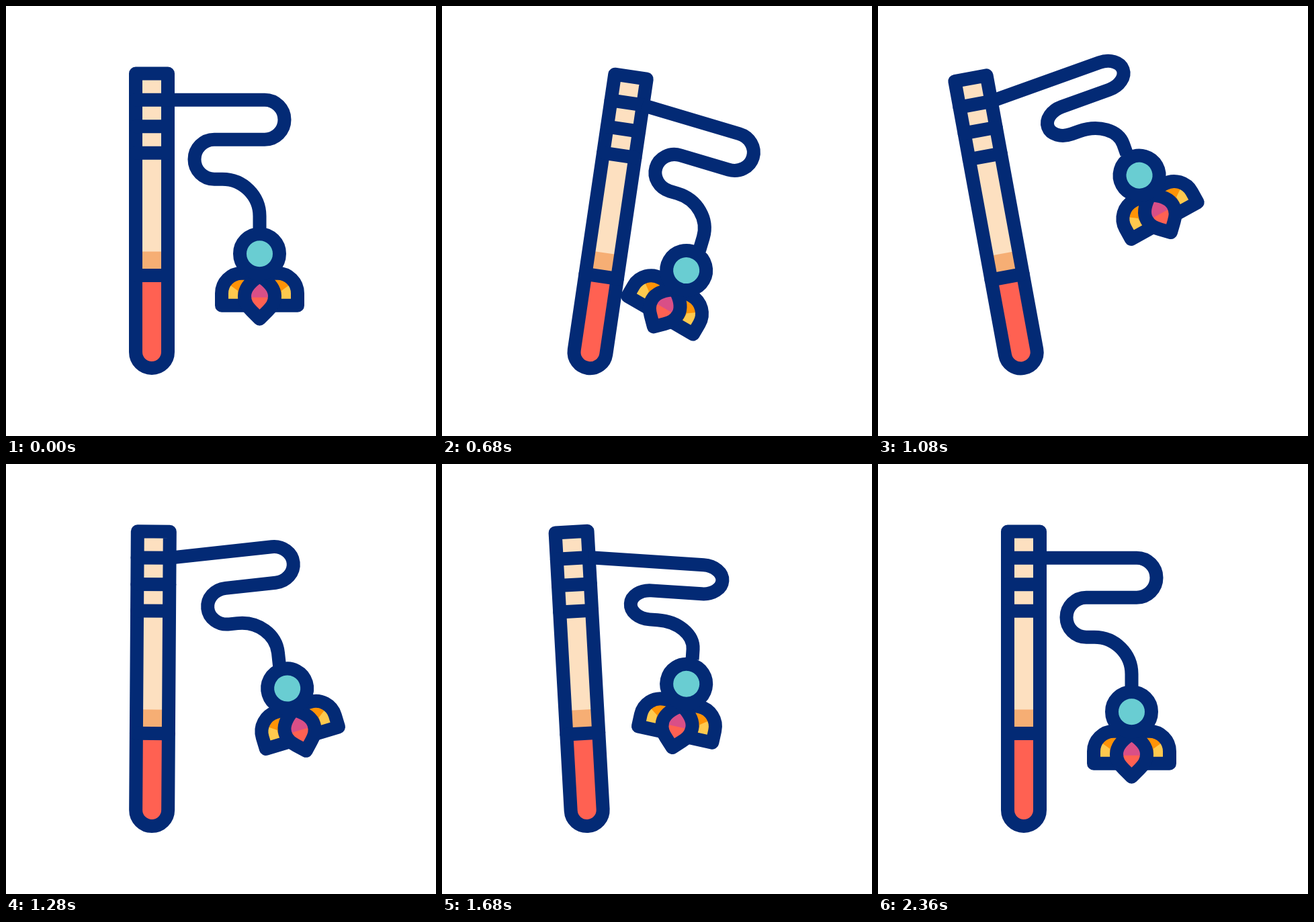
Recreate the animation shown at these times as an HTML page with a canvas. Size 640 px wide and 640 px high, loop 2600 ms.

```html
<!DOCTYPE html>
<html lang="en">
<head>
<meta charset="utf-8">
<title>Cat wand</title>
<style>
  html, body { margin: 0; height: 100%; overflow: hidden; background: #fff; }
  canvas { display: block; width: 100vmin; height: 100vmin; }
</style>
</head>
<body>
<canvas id="stage" width="640" height="640"></canvas>
<script>
const ctx = document.getElementById('stage').getContext('2d');
const LOOP = 2600, STEP = 40;
const NAVY = '#032a75', CREAM = '#fde0c0', TAN = '#f6ae74', RED = '#ff6152',
  TEAL = '#69cdd2', ORANGE = '#ff9307', YELLOW = '#ffc94e', PINK = '#d94f87';

// Turning points of the swing, in ms. Every joint follows them, later and slower.
const BEATS = [200, 690, 1060, 1470, 1825, 2100];

const ease = p => (1 - Math.cos(Math.PI * p)) / 2;

// Eases from rest through the turns, one per beat, and back to rest.
function swing(t, lag, tempo, ...turns) {
  const time = BEATS[0] + (t - BEATS[0] - lag) / tempo;
  const i = BEATS.findIndex(beat => beat > time);
  if (i < 1) return 0;
  const [from = 0, to = 0] = [turns[i - 2], turns[i - 1]];
  return from + (to - from) * ease((time - BEATS[i - 1]) / (BEATS[i] - BEATS[i - 1]));
}

const rodAngle = t => swing(t, 0, 1, 8.4, -10.5, 9, -10);
const cordAngle = t => swing(t, 0, 1.1, 8.4, -10.5, 9, -10);
const toyAngle = t => swing(t, 60, 1.07, 15, -13.5, 10, -11.5);
const cordSquash = t => Math.min(1, swing(t, -150, 1.08, 0, 1.4, 0, 1.4));

const rotate = deg => ctx.rotate(deg * Math.PI / 180);

function rect(color, x, y, w, h) {
  ctx.fillStyle = color;
  ctx.fillRect(x, y, w, h);
}

// Fills a shape in two tones, then outlines it.
function twoTone(shape, base, accent, area) {
  ctx.fillStyle = base;
  ctx.fill(shape);
  ctx.save();
  ctx.clip(shape);
  ctx.fillStyle = accent;
  ctx.fill(area);
  ctx.restore();
  ctx.stroke(shape);
}

const rodShape = new Path2D('M193 100.5H241V515A24 24 0 0 1 193 515Z');
const bands = new Path2D('M193 139.7H241M193 179.2H241M193 218.7H241M193 401H241');
// Toy parts are placed around the centre of its ball.
const petal = new Path2D('M0 29H-26.5A30 30 0 0 0 -56.5 59V77H0Z');
const petalTip = new Path2D('M-70 90V40L-45 46L-32.5 55V90Z');
const gem = new Path2D('M0 33C-14 42 -22.5 52 -22.5 63C-22.5 74 -17 80 -12 85L0 97' +
  'L12 85C17 80 22.5 74 22.5 63C22.5 52 14 42 0 33Z');
const gemTip = new Path2D('M-40 65H40V110H-40Z');

function drawRod() {
  ctx.save();
  ctx.clip(rodShape);
  rect(CREAM, 183, 90, 68, 276);
  rect(TAN, 183, 365.5, 68, 36);
  rect(RED, 183, 401, 68, 150);
  ctx.restore();
  ctx.stroke(rodShape);
  ctx.stroke(bands);
}

function drawCord(shift, scale) {
  const q = Math.PI / 2;
  ctx.beginPath();
  ctx.moveTo(0, 0);
  ctx.save();
  ctx.translate(shift, 0);
  ctx.scale(1, scale);
  ctx.arc(145, 29.5, 29.5, -q, q);
  ctx.arc(70, 88.5, 29.5, -q, q, true);
  ctx.lineTo(82, 118);
  ctx.bezierCurveTo(113, 118, 137.5, 143, 137.5, 173);
  ctx.lineTo(137.5, 194);
  ctx.restore();
  ctx.stroke();
}

function drawToy() {
  for (const side of [1, -1]) {
    ctx.save();
    ctx.scale(side, 1);
    twoTone(petal, ORANGE, YELLOW, petalTip);
    ctx.restore();
  }
  twoTone(gem, PINK, RED, gemTip);
  ctx.beginPath();
  ctx.arc(0, 0, 29.5, 0, 7);
  ctx.fillStyle = TEAL;
  ctx.fill();
  ctx.stroke();
}

function draw(t) {
  const squash = cordSquash(t);
  const shift = 27 * squash, scale = 1 - .27 * squash;
  rect('#fff', 0, 0, 640, 640);
  ctx.strokeStyle = NAVY;
  ctx.lineWidth = 20;
  ctx.lineJoin = 'round';
  ctx.lineCap = 'round';
  ctx.save();
  ctx.translate(217, 539);
  rotate(rodAngle(t));
  ctx.translate(-217, -539);
  drawRod();
  ctx.translate(240, 139.7);
  rotate(cordAngle(t));
  ctx.lineCap = 'butt';
  drawCord(shift, scale);
  ctx.translate(137.5 + shift, 186 * scale);
  rotate(toyAngle(t));
  ctx.translate(0, 43);
  drawToy();
  ctx.restore();
}

const start = performance.now();
function tick() {
  const t = (performance.now() - start) % LOOP;
  draw(Math.floor(t / STEP) * STEP);
  requestAnimationFrame(tick);
}
tick();
</script>
</body>
</html>
```
